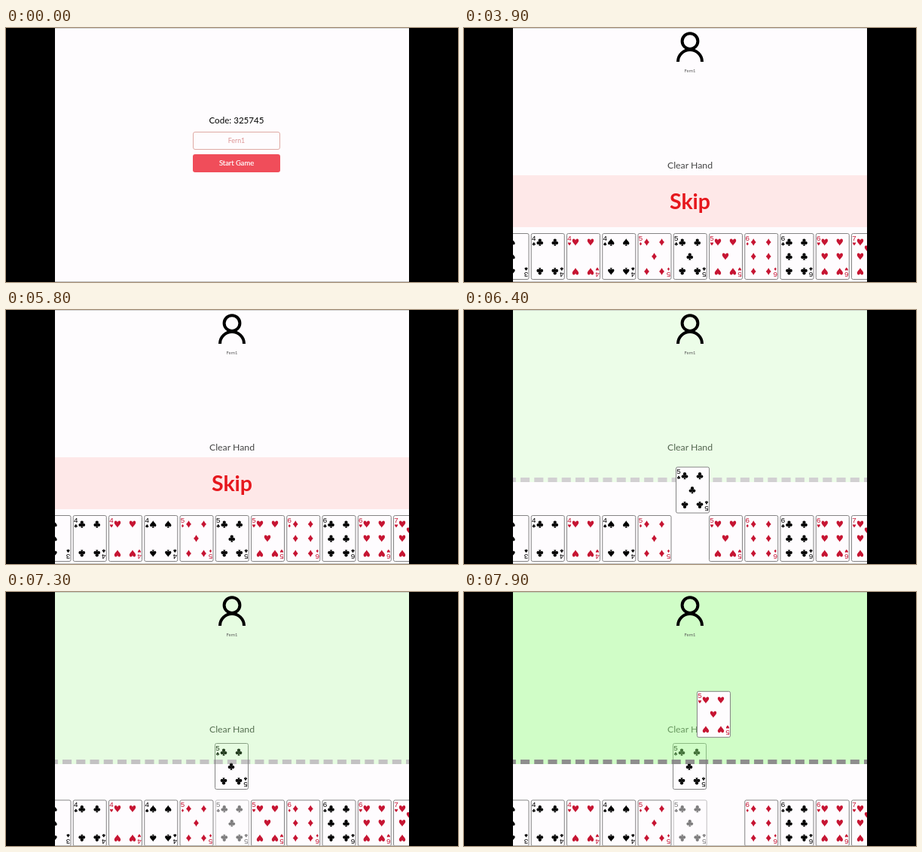
Write an HTML page that moves like this. It is 600 px wide and 338 px high and loops after 8000 ms.

```html
<!DOCTYPE html>
<html lang="en">
<head>
<meta charset="utf-8">
<title>Card game</title>
<style>
html, body { margin: 0; width: 100%; height: 100%; overflow: hidden; background: #000 }
svg { display: block; width: 100vw; height: 100vh }
text { font-family: Lato, sans-serif; text-anchor: middle }
.rank { font: 9.8px "Liberation Sans", Arial, sans-serif }
.field rect { fill: #fefcfe; stroke: #dfa9a3 }
.field text { font-size: 8.8px; fill: #dc9292 }
</style>
</head>
<body>
<svg viewBox="0 0 600 338">
  <defs>
    <clipPath id="view"><rect x="65" width="470" height="338"/></clipPath>
    <path id="H" d="M0 5C-1 2.5-4.5 .4-4.5-2.2C-4.5-5.6-.8-5.4 0-2.6C.8-5.4 4.5-5.6 4.5-2.2C4.5 .4 1 2.5 0 5Z"/>
    <path id="D" d="M0-5Q1.5-2 3.7 0Q1.5 2 0 5Q-1.5 2-3.7 0Q-1.5-2 0-5Z"/>
    <path id="S" d="M0-5C-1-2.5-4.5-.6-4.5 1.6C-4.5 4-1.4 4.2-.5 2.5Q-.6 4-1.8 5H1.8Q.6 4 .5 2.5C1.4 4.2 4.5 4 4.5 1.6C4.5-.6 1-2.5 0-5Z"/>
    <g id="C"><circle cy="-2.5" r="2.3"/><circle cx="-2.4" cy="1.1" r="2.3"/><circle cx="2.4" cy="1.1" r="2.3"/><path d="M-.8-1H.8Q.4 4 1.8 5H-1.8Q-.4 4-.8-1Z"/></g>
  </defs>
  <rect width="600" height="338"/>
  <g clip-path="url(#view)">
    <rect x="65" width="470" height="338" fill="#fefcfe"/>

    <g id="lobby">
      <g id="top">
        <text x="306" y="126.5" font-size="11.6">Code: 325745</text>
        <g class="field"><rect x="248.5" y="138.5" width="115" height="23" rx="2.5"/><text x="306" y="153.3">Fern1</text></g>
      </g>
      <g id="second" class="field"><rect x="248.5" y="153.5" width="115" height="23" rx="2.5"/><text x="306" y="168.3">Fern2</text></g>
      <g id="start">
        <rect x="248" y="168" width="116" height="24" rx="3" fill="#f04d5a"/>
        <text x="306" y="183.3" font-size="9.4" fill="#fff" stroke="#fff" stroke-width=".2">Start Game</text>
      </g>
    </g>

    <g id="game">
      <text x="300" y="186.5" font-size="12.3" fill="#444">Clear Hand</text>
      <g id="skip">
        <rect x="65" y="196" width="470" height="69" fill="#fee8e8"/>
        <text x="300" y="241" font-size="28.5" font-weight="700" fill="#e6171d">Skip</text>
      </g>
      <g id="hand"></g>
      <g id="picked"></g>
      <g id="zone">
        <rect x="65" width="470" height="229" fill="rgb(149,255,129)" opacity=".5"/>
        <path d="M56.76 226H543.24" stroke="#808080" stroke-width="6" stroke-dasharray="12.1 6.14"/>
      </g>
      <g fill="none" stroke="#000" stroke-width="4">
        <circle cx="300" cy="17.6" r="10.4"/><path d="M284 45a16 16 0 0 1 32 0"/>
      </g>
      <text x="300" y="59.3" font-size="5.8" fill="#555">Fern1</text>
      <g id="dragged"></g>
    </g>
    <path d="M65 337.5H535M65 .2H535" stroke="#aaa" stroke-width=".7"/>
  </g>
</svg>
<script>
const $ = id => document.getElementById(id);
const clamp = v => Math.max(0, Math.min(1, v));
const show = (el, on) => el.style.display = on ? '' : 'none';
const move = (el, x, y) => el.setAttribute('transform', `translate(${x} ${y})`);

// Pip positions, [column, row]
const sides = [[12, 12], [32, 12], [12, 51], [32, 51]];
const six = [...sides, [12, 31], [32, 31]];
const pips = {
  3: [[22, 12], [22, 31], [22, 51]], 4: sides, 5: [...sides, [22, 31]],
  6: six, 7: [...six, [22, 21]]
};

function cardMarkup([rank, suit]) {
  const corner = `<text class="rank" x="4" y="9.6">${rank}</text>
    <use href="#${suit}" transform="translate(4 14.3) scale(.45)"/>`;
  const marks = pips[rank].map(([x, y]) =>
    `<use href="#${suit}" transform="translate(${x} ${y}) rotate(${y > 40 ? 180 : 0}) scale(.93)"/>`);
  return `<rect x=".5" y=".5" width="44" height="61" rx="2" fill="#fefcfe" stroke="#777" stroke-width=".9"/>
    <g fill="${'HD'.includes(suit) ? '#c61432' : '#000'}">${corner}
    <g transform="rotate(180 22.5 31)">${corner}</g>${marks.join('')}</g>`;
}

function addCard(parent, name) {
  const g = document.createElementNS('http://www.w3.org/2000/svg', 'g');
  g.innerHTML = cardMarkup(name);
  return parent.appendChild(g);
}

const hand = '3S 4C 4H 4S 5D 5C 5H 6D 6C 6H 7H'.split(' ').map((name, i) => {
  const card = addCard($('hand'), name);
  move(card, 41.5 + 47.25 * i, 0);
  return card;
});
const [club, heart] = [hand[5], hand[6]];
move(addCard($('picked'), '5C'), 277, 201);

// Each drag: start, end and path of [time, x, y]
const drags = [
  { card: addCard($('dragged'), '5C'), from: 6273, to: 7100, path: [
    [6273, 278, 273], [6300, 280, 255], [6400, 281, 209], [6500, 281, 165],
    [6600, 280, 132], [6750, 280, 112], [7000, 280, 104]] },
  { card: addCard($('dragged'), '5H'), from: 7573, to: 8000, path: [
    [7573, 325, 277], [7600, 321, 255], [7700, 316, 194], [7800, 312, 160],
    [7900, 309, 132], [8000, 307, 112]] }
];

function along(path, t) {
  const i = path.findIndex(p => p[0] > t);
  if (i < 0) return path.at(-1).slice(1);
  const a = path[i - 1], b = path[i], k = (t - a[0]) / (b[0] - a[0]);
  return [a[1] + (b[1] - a[1]) * k, a[2] + (b[2] - a[2]) * k];
}

function draw(t) {
  const joined = t >= 1600, playing = t >= 3900;
  const [first, next] = drags;
  const dropped = t >= first.to;
  show($('lobby'), !playing);
  show($('game'), playing);
  show($('second'), joined);
  move($('top'), 0, joined ? -15 : 0);
  move($('start'), 0, joined ? 14.7 : 0);

  let zone = 0;
  for (const { card, from, to, path } of drags) {
    const active = t >= from && t < to;
    show(card, active);
    if (active) move(card, ...along(path, t));
    zone += clamp((t - from) / 372) - clamp((t - to) / 372);
  }
  $('zone').setAttribute('opacity', clamp(zone));
  show($('skip'), t < first.from);
  show($('picked'), dropped);
  move($('hand'), 0, dropped ? 276.5 : 273);
  show(club, t < first.from || dropped);
  club.setAttribute('opacity', dropped ? .5 : 1);
  show(heart, t < next.from);
}

const begin = performance.now();
function tick() {
  draw((performance.now() - begin) % 8000);
  requestAnimationFrame(tick);
}
tick();
</script>
</body>
</html>
```
